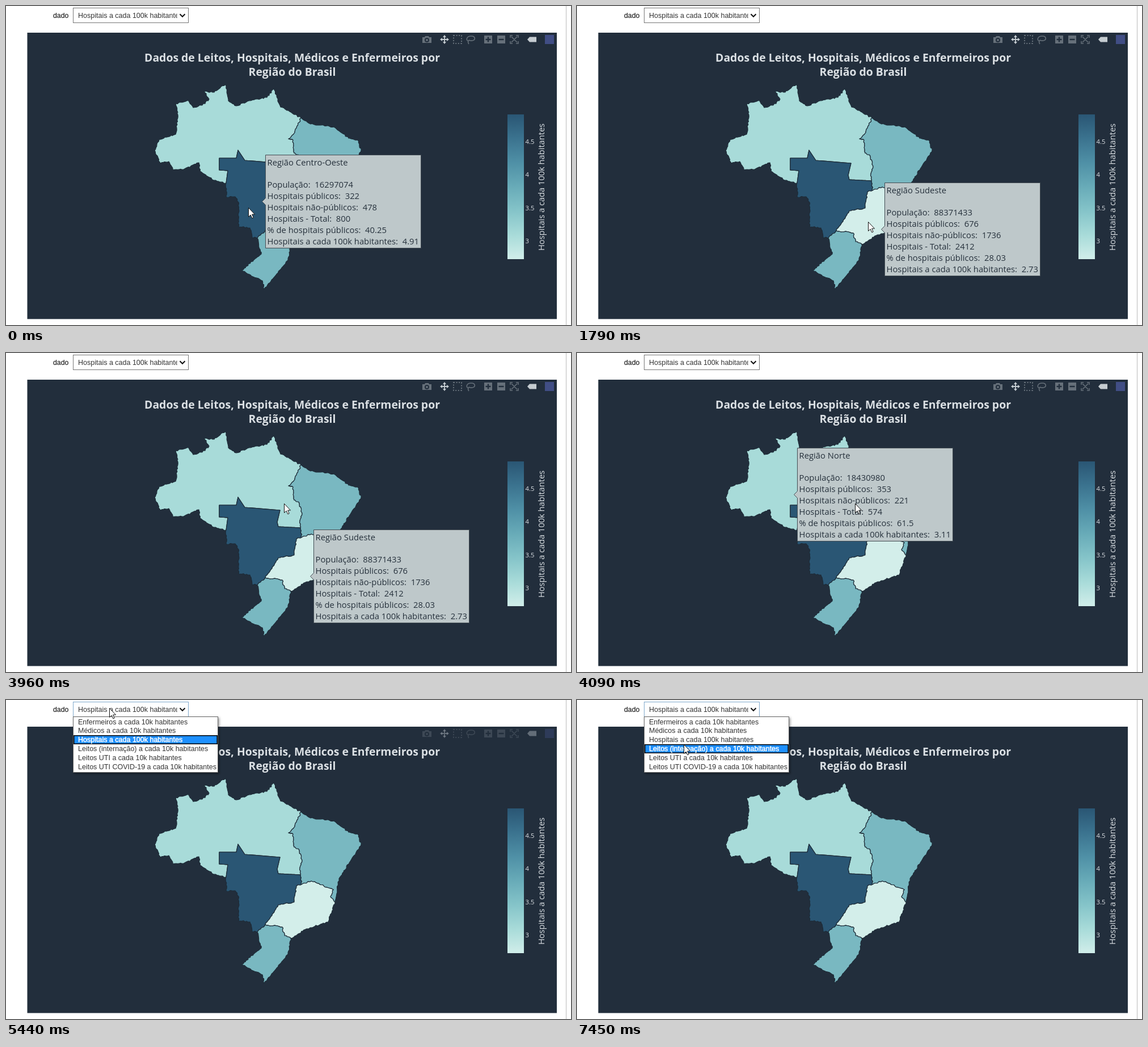
Write an HTML page with a canvas that moves like this. It is 996 px wide and 562 px high and loops after 8 s.

```html
<!DOCTYPE html>
<html lang="pt">
<head>
<meta charset="utf-8">
<title>Dados de saúde por região</title>
<style>
html, body { margin: 0; overflow: hidden; background: #fff; }
canvas { display: block; }
</style>
</head>
<body>
<canvas id="stage" width="996" height="562"></canvas>
<script>
const g = document.getElementById('stage').getContext('2d');
const LOOP = 8000, HOP = 155, NAVY = '#222e3c', PALE = '#dbe0e4';
const OPEN_AT = 5440, PICK_AT = 7450;
const SANS = '"Open Sans", "Noto Sans", sans-serif';
const ARIAL = '"Liberation Sans", Arial, sans-serif';
const teal = ['#2a5674', '#3b738f', '#4f90a6', '#68abb8', '#85c4c9', '#a8dbd9', '#d1eeea'];

// Key points of the borders; neighbouring regions share them.
const arcs = {
  north: '388,312 366,307 342,291 340,276 313,288 294,288 287,274 272,277 262,255 270,235 299,226 303,192 299,172 322,167 330,179 351,172 358,164 349,150 367,152 387,138 392,167 406,176 428,167 460,161 472,146 484,178 520,197',
  nNe: '520,197 509,223 498,234 506,236 508,259 515,262 522,282 518,296 519,308',
  nCo: '519,308 480,306 478,298 483,277 421,272 409,254 406,268 376,268 376,289 391,290 388,312',
  coWest: '388,312 389,337 404,336 410,346 410,389 430,391 434,408 443,409',
  coS: '443,409 457,396',
  coSe: '457,396 480,361 508,356 512,328 521,325',
  coNe: '521,325 519,308',
  neSe: '521,325 538,319 577,334 572,346 580,356',
  neCoast: '520,197 537,208 578,213 604,233 620,236 626,255 607,284 587,315 580,356',
  seCoast: '580,356 568,391 528,404 502,420',
  seS: '457,396 487,400 491,415 502,420',
  sCoast: '502,420 497,448 476,474 455,499 452,484 415,466 450,437 443,409'
};

let seed = 7;
const rand = () => (seed = seed * 16807 % 2147483647) / 2147483647 - 0.5;

// Splits each edge into short pieces with a slight wobble.
function roughen(text, amount) {
  const pts = text.split(' ').map(p => p.split(',').map(Number));
  const out = [pts[0]];
  for (let i = 1; i < pts.length; i++) {
    const [ax, ay] = pts[i - 1], [bx, by] = pts[i];
    const n = Math.ceil(Math.hypot(bx - ax, by - ay) / 3);
    for (let k = 1; k < n; k++) {
      out.push([ax + (bx - ax) * k / n + rand() * amount, ay + (by - ay) * k / n + rand() * amount]);
    }
    out.push(pts[i]);
  }
  return out;
}
for (const key in arcs) arcs[key] = roughen(arcs[key], key === 'nCo' ? 0 : 2.2);

// A leading minus walks the border backwards.
const regions = [
  ['#a8dbd9', 'north nNe nCo'],
  ['#79b8c1', 'neCoast -neSe coNe -nNe'],
  ['#2a5674', '-nCo -coNe -coSe -coS -coWest'],
  ['#d3eeea', 'neSe seCoast -seS coSe'],
  ['#79b8c1', 'seS sCoast coS']
].map(([color, names]) => {
  const path = new Path2D();
  for (const name of names.split(' ')) {
    const pts = name[0] === '-' ? [...arcs[name.slice(1)]].reverse() : arcs[name];
    for (const [x, y] of pts) path.lineTo(x, y);
  }
  path.closePath();
  return [color, path];
});

const scale = g.createLinearGradient(0, 191, 0, 446);
teal.forEach((color, i) => scale.addColorStop(i / (teal.length - 1), color));

// Start time, pointer position, name, population, public and other hospitals.
const tips = [
  [0, 451.5, 344.5, 'Centro-Oeste', 16297074, 322, 478],
  [1790, 536.5, 393.5, 'Sudeste', 88371433, 676, 1736],
  [4090, 382.5, 249.5, 'Norte', 18430980, 353, 221]
];

const options = ['Enfermeiros a cada 10k', 'Médicos a cada 10k', 'Hospitais a cada 100k',
  'Leitos (internação) a cada 10k', 'Leitos UTI a cada 10k', 'Leitos UTI COVID-19 a cada 10k'
].map(name => name + ' habitantes');

// Cursor glides: start time, number of hops, end point.
const glides = [
  [0, 1, 427, 355], [1010, 3, 513, 380], [3660, 1, 514, 293], [3960, 1, 490, 265],
  [4990, 3, 182, 14], [6280, 2, 191, 24], [7050, 1, 193, 29], [7330, 1, 190, 62], [PICK_AT, 1, 188, 78]
];

function cursorAt(t) {
  const i = glides.findLastIndex(glide => glide[0] <= t);
  const [start, hops, x, y] = glides[i], [, , fromX, fromY] = glides[Math.max(i - 1, 0)];
  const done = Math.min(Math.floor((t - start) / HOP) + 1, hops) / hops;
  const rest = (1 - done) ** 4;
  return [x + (fromX - x) * rest, y + (fromY - y) * rest].map(Math.round);
}

function rect(x, y, w, h, color) {
  g.fillStyle = color;
  g.fillRect(x, y, w, h);
}
function frame(x, y, w, h, color) {
  g.strokeStyle = color;
  g.lineWidth = 1;
  g.strokeRect(x, y, w, h);
}
function text(str, x, y, font, color, align = 'left') {
  g.font = font;
  g.fillStyle = color;
  g.textAlign = align;
  g.fillText(str, x, y);
}
function shape(d, x, y, color, line) {
  const path = new Path2D(d);
  g.save();
  g.translate(x, y);
  if (line) {
    g.strokeStyle = color;
    g.lineWidth = line;
    g.stroke(path);
  } else {
    g.fillStyle = color;
    g.fill(path, 'evenodd');
  }
  g.restore();
}

function drawToolbar(alpha) {
  const dim = '#66707a', lit = '#c5ccd1', y = 59;
  g.globalAlpha = alpha;
  shape('M-8-4h4l1-2h6l1 2h4v10h-16zM4 1a4 4 0 1 0-8 0a4 4 0 1 0 8 0zM2 1a2 2 0 1 1-4 0a2 2 0 1 1 4 0z', 742, y, dim);
  shape('M-5 0H5M0-5V5', 773, y, lit, 1.8);
  shape('M0-8l3 4h-6zM0 8l3-4h-6zM-8 0l4-3v6zM8 0l-4-3v6z', 773, y, lit);
  g.setLineDash([2, 2.6]);
  shape('M-7-7H7V7H-7z', 796, y, dim, 2);
  g.setLineDash([]);
  shape('M-4 3C-9 1-7-6 1-6S9 1 3 2S-2-1-4 3S-2 6-4 8', 819, y, dim, 1.6);
  shape('M-7-7H7V7H-7zM-1.2-4.5v3.3h-3.3v2.4h3.3v3.3h2.4v-3.3h3.3v-2.4h-3.3v-3.3z', 850, y, dim);
  shape('M-7-7H7V7H-7zM-4.5-1.2v2.4h9v-2.4z', 873, y, dim);
  shape('M-7-3V-7H-3M3-7H7V-3M7 3V7H3M-3 7H-7V3M-5-5L5 5M5-5L-5 5', 896, y, dim, 1.5);
  shape('M-8 0l4-4.5H8v9H-4z', 927, y, lit);
  rect(950, 51, 16, 16, '#414e85');
  g.globalAlpha = 1;
}

function drawChart() {
  rect(37.5, 47, 933.5, 504.5, NAVY);
  const bold = '700 19.4px ' + SANS;
  text('Dados de Leitos, Hospitais, Médicos e Enfermeiros por', 504.5, 97.5, bold, PALE, 'center');
  text('Região do Brasil', 504.5, 122.5, bold, PALE, 'center');
  g.lineJoin = 'round';
  g.lineWidth = 1.2;
  g.strokeStyle = '#1d2b37';
  for (const [color, path] of regions) {
    g.fillStyle = color;
    g.fill(path);
    g.stroke(path);
  }
  g.lineJoin = 'miter';
  rect(884, 191, 29, 255, scale);
  for (let i = 0; i < 4; i++) {
    text(4.5 - i / 2, 915.5, 243 + i * 58.4, '11.3px ' + SANS, PALE);
  }
  g.save();
  g.translate(948.5, 319);
  g.rotate(-Math.PI / 2);
  text(options[2], 0, 0, '14.65px ' + SANS, PALE, 'center');
  g.restore();
}

function drawTip([, x, y, name, people, owned, other]) {
  const box = 'M0 0l6-6v-76h274v164h-274v-76z', font = '14.8px ' + SANS, ink = '#26313c';
  const total = owned + other, round = v => +v.toFixed(2);
  shape(box, x, y, '#bec8ca');
  shape(box, x, y, '#444d54', 1);
  [
    'Região ' + name,
    '',
    'População:  ' + people,
    'Hospitais públicos:  ' + owned,
    'Hospitais não-públicos:  ' + other,
    'Hospitais - Total:  ' + total,
    '% de hospitais públicos:  ' + round(owned / total * 100),
    options[2] + ':  ' + round(total / people * 1e5)
  ].forEach((line, i) => text(line, x + 9, y - 64 + i * 19.95, font, ink));
}

function drawSelect(open) {
  text('dado', 83, 21, '12.3px ' + ARIAL, '#000');
  rect(118, 3, 204, 27, '#fff');
  frame(118.5, 3.5, 203, 26, open ? '#7fa9cc' : '#767676');
  g.save();
  g.beginPath();
  g.rect(120, 4, 182, 25);
  g.clip();
  text(options[2], 127, 21, '12.5px ' + ARIAL, '#333');
  g.restore();
  shape('M-4.5-2.3L0 2.3L4.5-2.3', 311, 16.5, '#111', 2);
}

function drawMenu(picked) {
  g.save();
  g.shadowColor = 'rgba(0,0,0,.4)';
  g.shadowBlur = 4;
  g.shadowOffsetX = g.shadowOffsetY = 2;
  rect(118, 29, 256, 99, '#fff');
  g.restore();
  frame(118.5, 29.5, 255, 98, '#666');
  options.forEach((label, i) => {
    const y = 42.5 + i * 15.9, on = i === picked;
    if (on) {
      rect(119, y - 12.3, 254, 16, '#000');
      rect(120.5, y - 10.8, 251, 13, '#1e90ff');
    }
    text(label, 127, y, '12.5px ' + ARIAL, on ? '#fff' : '#333');
    if (on) {
      g.strokeStyle = '#fff';
      g.lineWidth = 0.5;
      g.strokeText(label, 127, y);
    }
  });
}

function drawCursor(x, y) {
  const arrow = 'M0 0V16L3.7 12.6L6.3 18.3L8.7 17.3L6.2 11.6H11z';
  shape(arrow, x + 0.5, y + 0.5, '#fff');
  shape(arrow, x + 0.5, y + 0.5, '#111', 1);
}

function draw(now) {
  const t = now % LOOP, open = t >= OPEN_AT;
  rect(0, 0, 996, 562, '#fff');
  rect(987, 0, 1, 562, '#bbb');
  drawChart();
  if (t < OPEN_AT + 120) drawToolbar(open ? 0.4 : 1);
  if (!open) drawTip(tips.findLast(tip => tip[0] <= t));
  drawSelect(open);
  if (open) drawMenu(t < PICK_AT ? 2 : 3);
  drawCursor(...cursorAt(t));
  requestAnimationFrame(draw);
}
requestAnimationFrame(draw);
</script>
</body>
</html>
```
